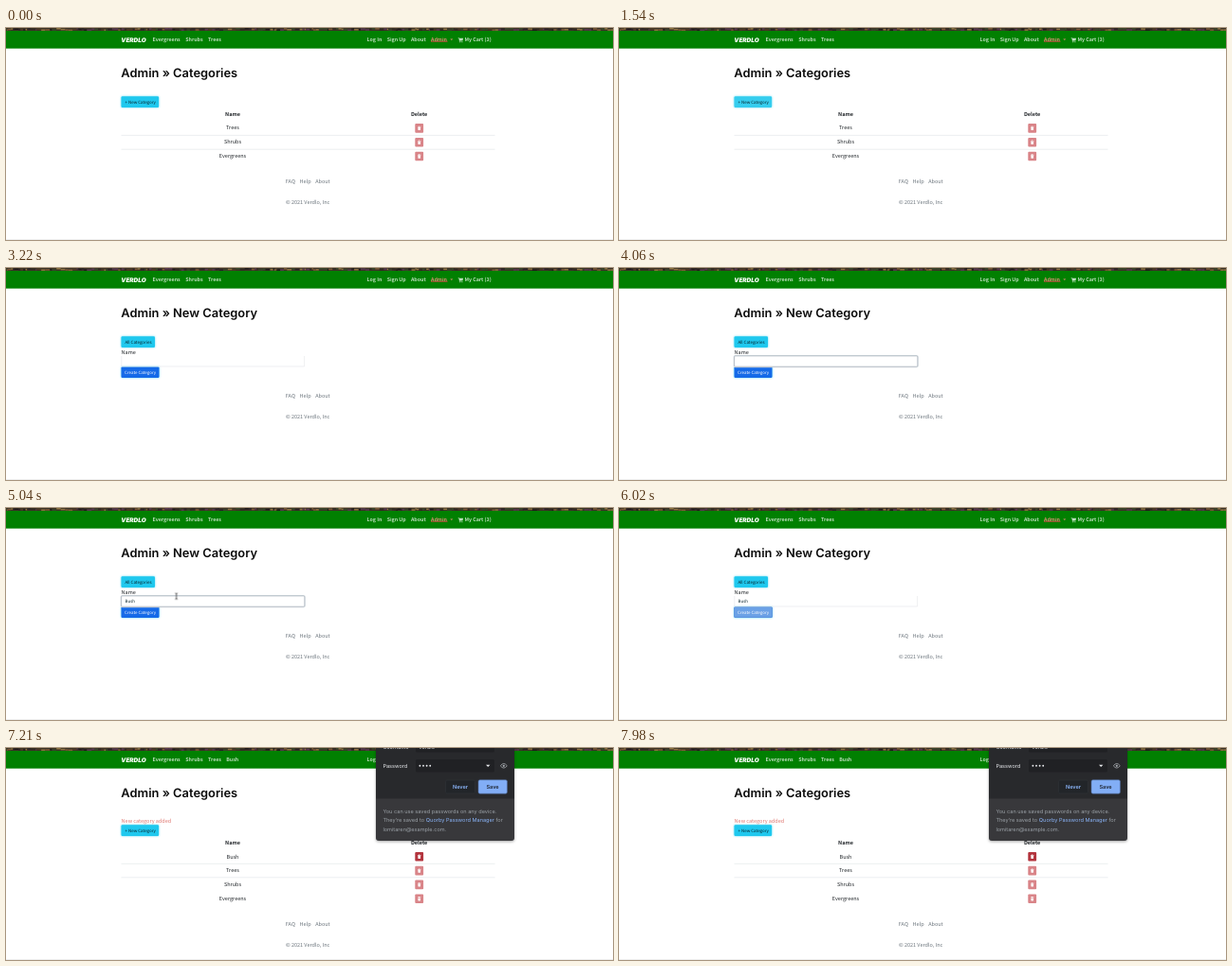
An HTML page for the animation above (8 s loop, 640 px wide and 224 px high).

```html
<!DOCTYPE html>
<html lang="en">
<head>
<meta charset="utf-8">
<title>Admin categories</title>
<style>
  html, body { margin: 0; width: 100%; height: 100%; overflow: hidden; background: #fff; }
  svg { display: block; width: 640px; height: 224px; }
  text { font: 5.5px "Noto Sans CJK JP", "Noto Sans CJK SC", "Noto Sans", sans-serif; fill: #212529; text-rendering: geometricPrecision; white-space: pre; }
  .nav text { font-size: 5.3px; font-weight: 700; fill: #bfdfbf; }
  .nav .brand { font: italic 900 6.4px Inter, sans-serif; fill: #fff; }
  .nav .admin { fill: #d98f74; }
  .title { font: 600 12.9px Inter, sans-serif; fill: #0c0c0c; }
  .btn { font-size: 4.45px; fill: #06222a; }
  .light { fill: #fff; }
  .mid { text-anchor: middle; }
  .head { font-weight: 700; text-anchor: middle; }
  .muted text { fill: #6c757d; }
  .flash { fill: #df766f; }
  .rule { stroke: #dee2e6; stroke-width: .6; }
  .info { fill: #1fc8ee; }
  .glow { filter: drop-shadow(.3px .6px .9px #5fdcf5); }
  .bin { fill: #d98488; }
  .bin.on { fill: #b3343d; }
  .pop text { font: 5.6px Inter, sans-serif; fill: #9aa0a6; }
  .pop .white { fill: #e8eaed; }
  .pop .link { fill: #8ab4f8; }
  .pop .bold { font-weight: 600; }
  .pop .dark { fill: #202733; }

  .list, .form, .added, .hover, .focus, .press, .type, .beam { animation: 8s step-end infinite; }
  .list { animation-name: list; }
  .form { animation-name: form; }
  .added { animation-name: added; }
  .hover { animation-name: hover; }
  .focus { animation-name: focus; }
  .press { animation-name: press; }
  .beam { animation-name: beam, glide; animation-timing-function: step-end, ease-in-out; }
  .b { animation-name: typeB; }
  .u { animation-name: typeU; }
  .s { animation-name: typeS; }
  .h { animation-name: typeH; }
  .pop { animation: pop 8s linear infinite; }

  @keyframes list { 0% { visibility: visible } 20.125%, 100% { visibility: hidden } }
  @keyframes form { 0% { visibility: hidden } 20.125% { visibility: visible } 76.125%, 100% { visibility: hidden } }
  @keyframes added { 0% { visibility: hidden } 76.125%, 100% { visibility: visible } }
  @keyframes hover { 0% { fill: #1fc8ee } 18.375%, 100% { fill: #35cdee } }
  @keyframes focus { 0% { opacity: 0 } 45.5% { opacity: 1 } 70%, 100% { opacity: 0 } }
  @keyframes press { 0% { opacity: 0 } 70%, 100% { opacity: 1 } }
  @keyframes typeB { 0% { fill-opacity: 0 } 54.25%, 100% { fill-opacity: 1 } }
  @keyframes typeU { 0% { fill-opacity: 0 } 55.125%, 100% { fill-opacity: 1 } }
  @keyframes typeS { 0% { fill-opacity: 0 } 56.875%, 100% { fill-opacity: 1 } }
  @keyframes typeH { 0% { fill-opacity: 0 } 59.5%, 100% { fill-opacity: 1 } }
  @keyframes beam { 0% { opacity: 0 } 60.375% { opacity: 1 } 65.625%, 100% { opacity: 0 } }
  @keyframes glide {
    0%, 60.375% { transform: translate(184px, 98px) }
    62.125%, 63.875% { transform: translate(179.6px, 93.2px) }
    65.625%, 100% { transform: translate(168px, 100px) }
  }
  @keyframes pop { 0%, 77% { opacity: 0 } 78.75%, 99.99% { opacity: 1 } 100% { opacity: 0 } }
</style>
</head>
<body>
<svg viewBox="0 0 640 224">
  <defs>
    <path id="can" d="M-1.7-1.7h3.4v.6h-3.4zM-.6-2.2h1.2v.5h-1.2zM-1.4-.8h2.8l-.2 3h-2.4z" fill="#fff"/>
    <g id="foot" class="muted">
      <text x="294.8" y="0">FAQ</text>
      <text x="309.6" y="0">Help</text>
      <text x="326.2" y="0">About</text>
      <text x="318.2" y="21.8" class="mid">© 2021 Verdlo, Inc</text>
    </g>
    <g id="bin"><rect x="431.3" y="-4.8" width="8.8" height="9.6" rx="1"/><use href="#can" x="435.7"/></g>
    <filter id="shade" x="-10%" y="-10%" width="120%" height="125%">
      <feDropShadow dx="0" dy="1" stdDeviation="1.5" flood-opacity=".35"/>
    </filter>
    <linearGradient id="edge" x2="0" y2="1">
      <stop stop-color="#018001"/>
      <stop offset="1" stop-color="#fff"/>
    </linearGradient>
  </defs>

  <rect width="640" height="224" fill="#fff"/>
  <g id="photo"><rect width="640" height="3" fill="#3b3226"/></g>

  <g class="nav">
    <rect y="3" width="640" height="18" fill="#018001"/>
    <rect y="21" width="640" height="1.5" fill="url(#edge)"/>
    <text x="121.3" y="14.6" class="brand">VERDLO</text>
    <text x="154.6" y="14.4">Evergreens</text>
    <text x="189.2" y="14.4">Shrubs</text>
    <text x="212.9" y="14.4">Trees</text>
    <text x="232.2" y="14.4" class="added">Bush</text>
    <text x="380.5" y="14.4">Log In</text>
    <text x="401.7" y="14.4">Sign Up</text>
    <text x="426.9" y="14.4">About</text>
    <rect x="448" y="13.6" width="17.5" height="1.4" fill="#8a5a2c"/>
    <text x="448" y="14.4" class="admin">Admin</text>
    <path d="M468.3 11.4h3l-1.5 1.6z" fill="#d98f74"/>
    <path d="M476.6 10.2h1.1l.2.6h4.2l-.6 2.5h-3l.1.5h2.8v.5h-3.3l-.8-3.6h-.7z" fill="#bfdfbf"/>
    <circle cx="478.7" cy="14.8" r=".55" fill="#bfdfbf"/>
    <circle cx="480.9" cy="14.8" r=".55" fill="#bfdfbf"/>
    <text x="483.4" y="14.4">My Cart (3)</text>
  </g>

  <g class="list">
    <text x="121.3" y="51.6" class="title">Admin » Categories</text>
    <g class="glow"><rect x="121.5" y="72.2" width="39.6" height="11.7" rx="1.2" class="info hover"/></g>
    <text x="125.6" y="79.7" class="btn">+ New Category</text>
    <text x="239" y="93.2" class="head">Name</text>
    <text x="435.6" y="93.2" class="head">Delete</text>
    <path d="M121.5 113.4h394M121.5 128.2h394" class="rule"/>
    <text x="239" y="107.4" class="mid">Trees</text>
    <text x="239" y="122.2" class="mid">Shrubs</text>
    <text x="239" y="137" class="mid">Evergreens</text>
    <use href="#bin" y="105.9" class="bin"/>
    <use href="#bin" y="120.7" class="bin"/>
    <use href="#bin" y="135.5" class="bin"/>
    <use href="#foot" y="164"/>
  </g>

  <g class="form">
    <text x="121.3" y="51.6" class="title">Admin » New Category</text>
    <rect x="121.5" y="72.2" width="35.5" height="11.7" rx="1.2" class="info glow"/>
    <text x="125.4" y="79.7" class="btn">All Categories</text>
    <text x="121.6" y="90.5">Name</text>
    <rect x="121.5" y="104.4" width="40" height="11.5" rx="1.2" fill="#156ae8" class="glow"/>
    <rect x="121.6" y="104.5" width="39.9" height="11.2" rx="1.2" fill="#6ba1e6" stroke="#5f93d8" stroke-width=".6" class="press"/>
    <text x="125.1" y="111.7" class="btn light">Create Category</text>
    <path d="M121.8 93v11h192.8v-11" fill="none" stroke="#e2e4e7" stroke-width=".6"/>
    <g class="focus">
      <rect x="121.4" y="92.7" width="193.6" height="11.8" rx="1.3" fill="#fff" stroke="#d9dfe4" stroke-width="1.6"/>
      <rect x="121.6" y="92.9" width="193.2" height="11.3" rx="1" fill="#fff" stroke="#a3adb6" stroke-width=".7"/>
    </g>
    <text x="125.6" y="100.2" class="btn"><tspan class="type b">B</tspan><tspan class="type u">u</tspan><tspan class="type s">s</tspan><tspan class="type h">h</tspan></text>
    <use href="#foot" y="136.8"/>
    <path class="beam" d="M-1.3-3.2q1.3 0 1.3 .8v4.8q0 .8-1.3 .8M1.3-3.2q-1.3 0-1.3 .8M1.3 3.2q-1.3 0-1.3-.8" fill="none" stroke="#222" stroke-width=".7"/>
  </g>

  <g class="added">
    <text x="121.3" y="51.6" class="title">Admin » Categories</text>
    <text x="121.6" y="78.9" class="flash">New category added</text>
    <rect x="121.5" y="81.3" width="39.6" height="11.7" rx="1.2" class="info glow"/>
    <text x="125.6" y="88.8" class="btn">+ New Category</text>
    <text x="239" y="102.2" class="head">Name</text>
    <text x="435.6" y="102.2" class="head">Delete</text>
    <path d="M121.5 122.3h394M121.5 136.8h394" class="rule"/>
    <text x="239" y="116.5" class="mid">Bush</text>
    <text x="239" y="131.3" class="mid">Trees</text>
    <text x="239" y="146.1" class="mid">Shrubs</text>
    <text x="239" y="160.9" class="mid">Evergreens</text>
    <use href="#bin" y="114.8" class="bin on"/>
    <use href="#bin" y="129.6" class="bin"/>
    <use href="#bin" y="144.4" class="bin"/>
    <use href="#bin" y="159.2" class="bin"/>
    <use href="#foot" y="188.2"/>
  </g>

  <g class="pop">
    <path d="M390 -4h146v99q0 3-3 3h-140q-3 0-3-3z" fill="#37383b" filter="url(#shade)"/>
    <path d="M390 0h146v53.5h-146z" fill="#28292c"/>
    <text x="397.4" y="1.2" class="white">Username</text>
    <rect x="432" y="-8" width="83" height="12.5" rx="1.5" fill="#202124"/>
    <text x="435" y="1.2" class="white">Verdlo</text>
    <text x="397.4" y="20.7" class="white">Password</text>
    <rect x="432" y="12" width="83" height="13.5" rx="1.5" fill="#202124"/>
    <g fill="#e8eaed">
      <circle cx="436.4" cy="18.8" r=".95"/>
      <circle cx="440" cy="18.8" r=".95"/>
      <circle cx="443.6" cy="18.8" r=".95"/>
      <circle cx="447.2" cy="18.8" r=".95"/>
      <path d="M506 17.8h4.4l-2.2 2.3z"/>
    </g>
    <path d="M521.3 18.8q3.5-4.6 7 0q-3.5 4.6-7 0z" fill="none" stroke="#a9adb2" stroke-width=".8"/>
    <circle cx="524.8" cy="18.8" r="1.1" fill="#a9adb2"/>
    <rect x="463.5" y="34" width="31" height="14" rx="1.6" fill="#222529" stroke="#33363a" stroke-width=".5"/>
    <text x="479" y="43" class="link bold mid">Never</text>
    <rect x="498" y="33.7" width="30.4" height="14.5" rx="1.6" fill="#82aef6" stroke="#4d6a9b" stroke-width=".6"/>
    <text x="513" y="43" class="dark bold mid">Save</text>
    <text x="397.4" y="69.4">You can use saved passwords on any device.</text>
    <text x="397.4" y="78.4">They’re saved to <tspan class="link">Quorby Password Manager</tspan> for</text>
    <text x="397.4" y="87.6">lomitaren@example.com.</text>
  </g>

  <rect y="223" width="640" height="1" fill="#eee"/>
</svg>
<script>
  // Mottled foliage along the top edge, from a seeded generator.
  const tones = ['#1f1b1a', '#4d3b24', '#37472a', '#7a5a35', '#2a2326', '#8c7440', '#57394f', '#302a20'];
  let seed = 11;
  const rand = () => (seed = (seed * 16807) % 2147483647) / 2147483647;
  const photo = document.getElementById('photo');
  for (let x = 0; x < 640;) {
    const w = 1 + rand() * 4;
    const leaf = document.createElementNS('http://www.w3.org/2000/svg', 'rect');
    const attrs = { x, y: rand() * 1.5, width: w, height: 1.5, fill: tones[Math.floor(rand() * tones.length)] };
    for (const k in attrs) leaf.setAttribute(k, attrs[k]);
    photo.append(leaf);
    x += w;
  }
</script>
</body>
</html>
```
